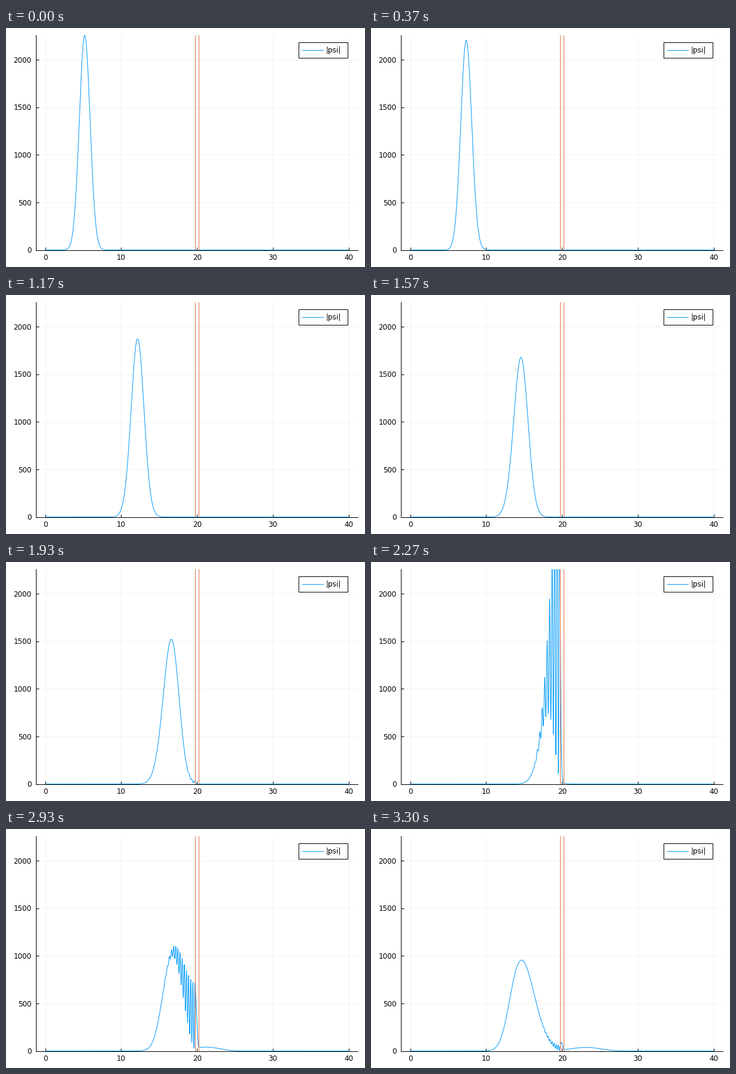
Animation, 600 px wide and 400 px high, one loop 3330 ms. Source, as a matplotlib script:

```python
import numpy as np
import matplotlib.pyplot as plt
from matplotlib.animation import FuncAnimation
from matplotlib.patches import Rectangle

W, H = 600, 400
PX = 0.72  # points per pixel at 100 dpi
BLUE, ORANGE = "#009AFA", "#E26F46"
FRAMES, LOOP_MS = 100, 3330

# Wave packet and square barrier
LENGTH, CELLS = 40.0, 4000
START, WAVENUMBER = 5.0, 10.0
WALLS, HEIGHT = (19.75, 20.25), 60.0
DT = 0.04
PEAK = CELLS / np.sqrt(np.pi)

x = np.linspace(0, LENGTH, CELLS + 1)
dx = x[1] - x[0]


def make_solver():
    """Return a solver for (1 + i H dt/2) phi = psi, H tridiagonal."""
    inside = (x > WALLS[0] - dx / 2) & (x < WALLS[1] + dx / 2)
    diag = 1 + 0.5j * DT * (1 / dx**2 + HEIGHT * inside)
    off = complex(0, -0.25 * DT / dx**2)
    inv, upper = [], []
    prev = 0j
    for d in diag.tolist():
        g = 1 / (d - off * prev)
        prev = off * g
        inv.append(g)
        upper.append(prev)

    def solve(psi):
        carry, fwd = 0j, []
        for r, g in zip(psi.tolist(), inv):
            carry = (r - off * carry) * g
            fwd.append(carry)
        carry, out = 0j, []
        for f, u in zip(reversed(fwd), reversed(upper)):
            carry = f - u * carry
            out.append(carry)
        return np.array(out[::-1])

    return solve


def evolve():
    """Crank-Nicolson steps, one per frame; returns the densities."""
    solve = make_solver()
    psi = np.sqrt(PEAK) * np.exp(-(x - START) ** 2 / 2 + 1j * WAVENUMBER * x)
    densities = []
    for _ in range(FRAMES):
        psi = 2 * solve(psi) - psi
        densities.append(np.abs(psi) ** 2)
    return densities


densities = evolve()

fig = plt.figure(figsize=(W / 100, H / 100), dpi=100, facecolor="white")
plt.rcParams["font.family"] = "DejaVu Sans"

LEFT, RIGHT, TOP, BOTTOM = 50.4, 588.2, 12.0, 371.6
ax = fig.add_axes([LEFT / W, 1 - BOTTOM / H, (RIGHT - LEFT) / W, (BOTTOM - TOP) / H])
ax.set_xlim(-0.03 * LENGTH, 1.03 * LENGTH)
ax.set_ylim(0, PEAK)
ax.set_xticks(range(0, 41, 10))
ax.set_yticks(range(0, 2001, 500))
ax.set_axisbelow(True)
ax.grid(color="black", alpha=0.1, linewidth=0.5 * PX)
ax.tick_params(direction="in", length=5 * PX, width=PX,
               labelbottom=False, labelleft=False)
for side in ("top", "right"):
    ax.spines[side].set_visible(False)
for side in ("left", "bottom"):
    ax.spines[side].set_linewidth(PX)
    ax.spines[side].set_zorder(6)


def label(px, py, text, ha="left"):
    fig.text(px / W, 1 - py / H, text, ha=ha, va="baseline",
             fontsize=12 * PX, zorder=12)


for v in ax.get_xticks():
    label(LEFT + (v + 1.2) / 42.4 * (RIGHT - LEFT), 387.5, f"{v:.0f}", "center")
for v in ax.get_yticks():
    label(42.3, BOTTOM - v / PEAK * (BOTTOM - TOP) + 4.6, f"{v:.0f}", "right")

curve, = ax.plot(x, densities[0], color=BLUE, linewidth=PX, zorder=3)
for wall in WALLS:
    ax.axvline(wall, color=ORANGE, linewidth=PX, zorder=4)

# Legend, laid out in pixels
key = fig.add_axes([0, 0, 1, 1], zorder=5)
key.set_xlim(0, W)
key.set_ylim(H, 0)
key.axis("off")
key.add_patch(Rectangle((488.5, 23.5), 82, 26, facecolor="white",
                        edgecolor="black", linewidth=PX))
key.plot([494.5, 530], [36.5, 36.5], color=BLUE, linewidth=PX)
label(534.5, 41, "|psi|")


def draw(i):
    curve.set_ydata(densities[i])
    return curve,


anim = FuncAnimation(fig, draw, frames=FRAMES, interval=LOOP_MS / FRAMES,
                     repeat=True, repeat_delay=0, blit=False)
plt.show()
```
